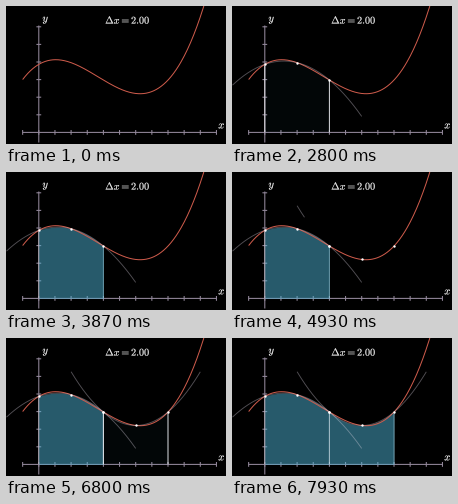
A matplotlib script for the animation above (8 s loop, 220 by 138 pixels).

```python
import matplotlib.pyplot as plt
import numpy as np
from matplotlib.animation import FuncAnimation
from matplotlib.patches import PathPatch
from matplotlib.textpath import TextPath
from matplotlib.transforms import Affine2D

plt.rcParams["mathtext.fontset"] = "cm"

W, H = 220, 138
LOOP, STEP = 8000, 50
X0, Y0 = 32.8, 126.4          # pixel position of the origin
UX, UY = 16.15, 17.6          # pixels per unit
AXIS, CURVE, FILL = "#94899c", "#cf5c4c", "#4fb4d6"

fig = plt.figure(figsize=(W / 72, H / 72), dpi=72, facecolor="black")
ax = fig.add_axes([0, 0, 1, 1])
ax.set_xlim(0, W)
ax.set_ylim(H, 0)
ax.axis("off")


def px(x):
    return X0 + UX * np.asarray(x, float)


def py(y):
    return Y0 - UY * np.asarray(y, float)


def f(x):
    return 3.865 + 0.0815 * (x**3 / 3 - 3.66 * x**2 + 6.58 * x)


def smooth(t, start, end):
    """Sigmoid easing from 0 to 1 between two times."""
    u = np.clip((t - start) / (end - start), 0, 1)
    sig = lambda v: 1 / (1 + np.exp(-v))
    low = sig(-5)
    return float(np.clip((sig(10 * (u - 0.5)) - low) / (1 - 2 * low), 0, 1))


def label(tex, cx, cy, size):
    path = TextPath((0, 0), tex, size=size)
    box = path.get_extents()
    move = Affine2D().translate(-(box.x0 + box.x1) / 2, -(box.y0 + box.y1) / 2)
    move.scale(1, -1).translate(cx, cy)
    ax.add_patch(PathPatch(move.transform_path(path), fc="white", ec="white", lw=0.15, zorder=9))


def stroke(xs, ys, **style):
    return ax.plot(xs, ys, solid_capstyle="butt", snap=False, **style)[0]


# Axes with ticks
axis = dict(color=AXIS, lw=1.05, zorder=1)
stroke([px(-1), px(11)], [Y0, Y0], **axis)
stroke([X0, X0], [19.5, 136.5], **axis)
for k in range(-1, 12):
    stroke([px(k)] * 2, [Y0 - 2.4, Y0 + 2.4], **axis)
for k in range(1, 7):
    stroke([X0 - 2.4, X0 + 2.4], [py(k)] * 2, **axis)

label("$y$", 39.2, 14.2, 10.7)
label("$x$", 215.2, 120, 10.7)
label(r"$\Delta x = 2.00$", 121.2, 14, 10.2)

xs = np.linspace(-1, 10.6, 300)
stroke(px(xs), py(f(xs)), color=CURVE, lw=1, zorder=6)


class Piece:
    """One Simpson panel: three dots, a parabola, two edges and an area."""

    def __init__(self, left, start, z):
        self.left, self.start = left, start
        nodes = left + np.array([0, 2, 4])
        self.coef = np.polyfit(nodes, f(nodes), 2)
        self.ends = nodes[[0, 2]]
        inner = np.linspace(left, left + 4, 80)
        self.area = ax.fill_between(px(inner), py(np.polyval(self.coef, inner)), Y0,
                                    color=FILL, lw=0, alpha=0, zorder=z + 0.5)
        self.edges = [stroke([], [], color="#e6e6ea", lw=1, zorder=z) for _ in self.ends]
        self.parabola = stroke([], [], color="#e4dcea", alpha=0.36, lw=0.9, zorder=7)
        self.dots = ax.plot(px(nodes), py(f(nodes)), "o", color="white", ms=2.4,
                            mew=0, alpha=0, snap=False, zorder=8)[0]

    def update(self, now):
        t = now - self.start
        self.dots.set_alpha(smooth(t, 0, 670))

        drawn = smooth(t, 670, 1670)
        first = self.left - 2
        part = np.linspace(first, first + 8 * drawn, 200 if drawn else 0)
        self.parabola.set_data(px(part), py(np.polyval(self.coef, part)))

        grown = smooth(t, 1700, 2670)
        filled = smooth(t, 2600, 3400)
        for x, edge in zip(self.ends, self.edges):
            edge.set_data([px(x)] * 2, [Y0, py(f(x) * grown)])
            edge.set_alpha((1 - 0.45 * filled) * (grown > 0))
        self.area.set_alpha(0.5 * filled)


pieces = [Piece(0, 0, 2), Piece(4, 4000, 3)]


def draw(i):
    for piece in pieces:
        piece.update(i * STEP)
    return []


anim = FuncAnimation(fig, draw, frames=LOOP // STEP, interval=STEP, repeat=True, repeat_delay=0)
plt.show()
```
